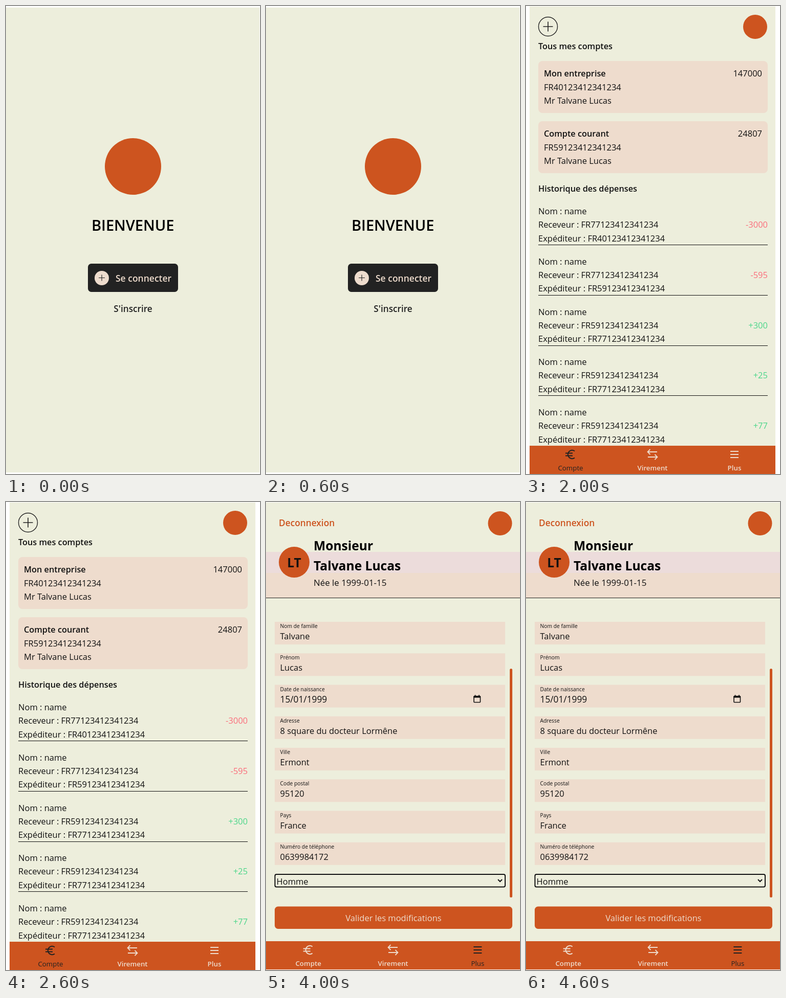
Animation of 496 by 910 pixels, one loop 5 s. Source, as an HTML page:

```html
<!DOCTYPE html>
<html lang="fr">
<head>
<meta charset="utf-8">
<title>Banque mobile</title>
<style>
  html, body { margin: 0; width: 100%; height: 100%; overflow: hidden; background: #fff; }
  svg { display: block; width: 496px; height: 910px; font-family: "Open Sans", "Noto Sans", sans-serif; }
  g { display: none; }
  g.on { display: inline; }
</style>
</head>
<body>
<svg id="stage" viewBox="0 0 496 910"></svg>
<script>
const BG = '#edeedc', ORANGE = '#cd541f', DARK = '#222', SAND = '#eedccd';
const RED = '#fb6d7b', GREEN = '#4bd68a', BODY = 16.5, ROUND = 6.5, HOLD = 1000;
const stage = document.getElementById('stage');
const screens = [];
let layer;

function add(tag, attrs) {
  const el = document.createElementNS('http://www.w3.org/2000/svg', tag);
  for (const key in attrs) el.setAttribute(key, attrs[key]);
  (layer || stage).appendChild(el);
  return el;
}

function screen(draw) {
  layer = null;
  layer = add('g', {});
  screens.push(layer);
  draw();
}

// Boxes are given by their left, top, right and bottom edges.
function box(l, t, r, b, fill, rx = 0, more = {}) {
  add('rect', { x: l, y: t, width: r - l, height: b - t, fill, rx, ...more });
}

function disc(cx, cy, r, fill, more = {}) {
  add('circle', { cx, cy, r, fill, ...more });
}

function path(d, stroke, width = 1, more = {}) {
  add('path', { d, stroke, 'stroke-width': width, fill: 'none', ...more });
}

function text(str, x, y, { size = BODY, weight = 400, fill = '#111', anchor = 'start' } = {}) {
  add('text', { x, y, fill, 'font-size': size, 'font-weight': weight, 'text-anchor': anchor }).textContent = str;
}

function button(l, t, r, b, label, fill, ink) {
  box(l, t, r, b, fill, ROUND);
  text(label, (l + r) / 2, b - 15, { fill: ink, anchor: 'middle' });
}

function nav(l, r, top, bottom, active) {
  box(l, top, r, bottom, ORANGE);
  const y = top + 17, step = (r - l) / 3;
  ['Compte', 'Virement', 'Plus'].forEach((label, i) => {
    const x = l + step * (i + 0.5), on = i === active, ink = on ? DARK : SAND;
    if (i === 0) {
      path(`M${x + 8} ${y - 6.5}A8.2 8.2 0 1 0 ${x + 8} ${y + 6.5}M${x - 10} ${y - 2.5}h14M${x - 10} ${y + 2.5}h14`, ink, 2);
    } else if (i === 1) {
      path(`M${x + 9} ${y - 5}h-18.5m5 -5l-5 5l5 5M${x - 9} ${y + 5}h18.5m-5 -5l5 5l-5 5`, ink, 1.8);
    } else {
      path(`M${x - 8} ${y - 6}h16m-16 6h16m-16 6h16`, ink, 1.9);
    }
    text(label, x, top + 48, { size: 13.3, weight: on ? 400 : 600, fill: ink, anchor: 'middle' });
  });
}

function field(l, t, r, label, value, size = BODY) {
  box(l, t, r, t + 44, SAND);
  text(label, l + 10.5, t + 12, { size: 10.3 });
  text(value, l + 10.5, t + 34, { size });
}

screen(() => {
  box(0, 3, 495, 907, BG);
  disc(248, 312, 55, ORANGE);
  text('BIENVENUE', 247.7, 437, { size: 29, weight: 600, fill: '#000', anchor: 'middle' });
  box(160, 501, 336, 556, DARK, ROUND);
  disc(187, 529, 14, SAND);
  path('M181 528.5h12m-6 -6v12', DARK, 1.1);
  text('Se connecter', 214, 536, { size: 17.5, weight: 600, fill: SAND });
  text("S'inscrire", 248, 595, { size: 17.2, weight: 600, fill: DARK, anchor: 'middle' });
});

screen(() => {
  box(0, 0, 495, 910, BG);
  disc(248, 281, 55, ORANGE);
  text('Entrez votre identifiant', 247.7, 356, { size: 16.4, weight: 600, anchor: 'middle' });
  text('identifiant oublié ?', 247.7, 378, { size: 12.6, fill: ORANGE, anchor: 'middle' });
  field(15, 400, 481, 'Email', 'lucas.talvane@mail.test');
  box(15.5, 462.5, 480.5, 505.5, SAND, ROUND - 0.5, { stroke: '#000' });
  text('Mot de passe', 26.5, 475, { size: 10.4 });
  for (let i = 0; i < 10; i++) disc(30 + i * 7.25, 490, 2.4, '#000');
  button(15, 523, 481, 567, 'Se connecter', ORANGE, SAND);
  button(15, 585, 481, 629, 'Retour', DARK, '#f4ebe4');
});

screen(() => {
  box(7, 1, 487, 910, BG);
  disc(43, 40, 18.5, 'none', { stroke: DARK, 'stroke-width': 1.4 });
  path('M33.5 40h19m-9.5 -9.5v19', DARK, 1.6);
  disc(447.5, 40.5, 23.5, ORANGE);
  text('Tous mes comptes', 24, 84, { size: 16.3, weight: 600 });

  [['Mon entreprise', 'FR40123412341234', '147000'], ['Compte courant', 'FR59123412341234', '24807']]
    .forEach(([name, iban, sum], i) => {
      const y = 107 + i * 117;
      box(24, y, 472, y + 101, SAND, 8);
      text(name, 35, y + 30, { size: 16.3, weight: 600 });
      text(iban, 35, y + 56.5);
      text('Mr Talvane Lucas', 35, y + 82.5);
      text(sum, 461, y + 30, { anchor: 'end' });
    });

  text('Historique des dépenses', 24, 361, { size: 16.3, weight: 600 });
  [['77', '40', '-3000'], ['77', '59', '-595'], ['59', '77', '+300'], ['59', '77', '+25'], ['59', '77', '+77']]
    .forEach(([to, from, sum], i) => {
      const y = 405 + i * 97.75;
      text('Nom : name', 24, y);
      text(`Receveur : FR${to}123412341234`, 24, y + 26);
      text(`Expéditeur : FR${from}123412341234`, 24, y + 52.5);
      text(sum, 472, y + 26, { fill: sum[0] === '-' ? RED : GREEN, anchor: 'end' });
      path(`M24 ${Math.round(y + 59) + 0.5}H472`, '#111', 1.1);
    });
  nav(7, 487, 855, 910, 0);
});

screen(() => {
  box(0, 1, 496, 909, BG);
  disc(456, 40.5, 23.5, ORANGE);
  text('Faire un virement de', 15.5, 94, { size: 24.3, weight: 600 });
  text('25', 15, 183, { size: 51.5, weight: 700, fill: ORANGE });
  text('€', 299.5, 183, { size: 51.5, weight: 700, fill: ORANGE });
  path('M16 200H334', ORANGE, 2);
  text('à', 15.5, 252);
  text('Lucas Talvane', 42, 252);
  path('M42 258.5H480', ORANGE, 1.2);
  text('Depuis : FR40123412341234', 15.5, 309);
  [['Mon entreprise', 'FR40123412341234', SAND, ORANGE], ['Compte courant', 'FR59123412341234', 'none', '#e6ebe2']]
    .forEach(([name, iban, fill, stroke], i) => {
      const y = 325 + i * 83;
      box(17, y + 1, 479, y + 73, fill, ROUND - 1, { stroke, 'stroke-width': 2 });
      text(name, 26.5, y + 30.5);
      text(iban, 26.5, y + 57);
    });
  button(16, 491, 480, 534.5, 'Valider le virement', ORANGE, SAND);
  nav(0, 496, 853, 909, 1);
});

screen(() => {
  box(0, 1, 496, 909, BG);
  box(0, 97, 496, 138, '#ecdcdb');
  box(0, 138, 496, 186, SAND);
  path('M0 186.5H496', '#222', 1);
  text('Deconnexion', 25, 47, { size: 17.3, weight: 600, fill: ORANGE });
  disc(457, 41.5, 23.5, ORANGE);
  disc(55, 117, 30, ORANGE);
  text('LT', 55, 127, { size: 24.5, weight: 700, anchor: 'middle' });
  text('Monsieur', 93, 94, { size: 24.6, weight: 700, fill: '#000' });
  text('Talvane Lucas', 93, 133, { size: 24.6, weight: 700, fill: '#000' });
  text('Née le 1999-01-15', 93, 163, { size: 16.9 });

  [['Nom de famille', 'Talvane'], ['Prénom', 'Lucas'], ['Date de naissance', '15/01/1999', 17.3],
    ['Adresse', '8 square du docteur Lormêne'], ['Ville', 'Ermont'], ['Code postal', '95120'],
    ['Pays', 'France'], ['Numéro de téléphone', '0639984172']]
    .forEach(([label, value, size], i) => field(17, 233 + i * 61.25, 467, label, value, size));

  box(406, 377.5, 418.5, 389.5, 'none', 1, { stroke: '#111', 'stroke-width': 1.6 });
  path('M405.5 379H419', '#111', 3);
  path('M408.5 375v3m7.5 -3v3', '#111', 1.6);

  box(17.5, 724, 467, 748.5, BG, 3, { stroke: '#111', 'stroke-width': 2 });
  text('Homme', 20.5, 743.5);
  path('M453 734l4 4l4 -4', '#111', 2);
  box(476, 324, 481, 769, ORANGE, 2.5);
  button(17, 786.5, 481, 830, 'Valider les modifications', ORANGE, SAND);
  nav(0, 496, 854, 909, 2);
});

function tick() {
  const now = Math.floor(performance.now() / HOLD) % screens.length;
  screens.forEach((s, i) => s.classList.toggle('on', i === now));
  requestAnimationFrame(tick);
}
tick();
</script>
</body>
</html>
```
